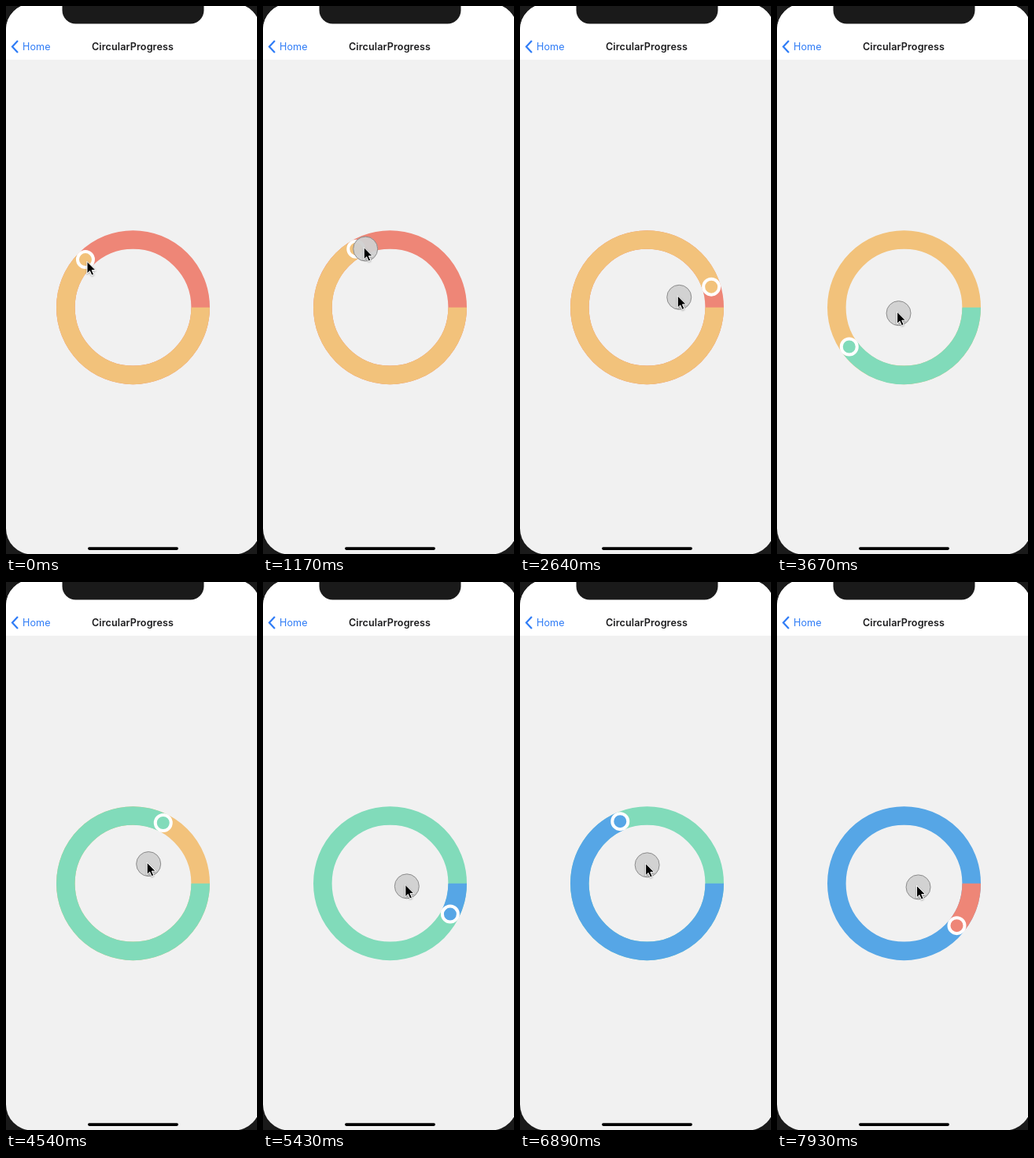
These frames come from a looping animation (319x694 px, 8 s). An HTML page:

```html
<!DOCTYPE html>
<html lang="en">
<head>
<meta charset="utf-8">
<title>Circular progress</title>
<style>
  html, body { margin: 0; width: 100%; height: 100%; overflow: hidden; background: #1a1a1a; }
  svg { display: block; width: 319px; height: 694px; }
  text { font: 12.6px Inter, "Open Sans", sans-serif; letter-spacing: .1px; }
  .title { font-weight: 600; text-anchor: middle; }
  .ring { fill: none; stroke-width: 23.6; }
</style>
</head>
<body>
<svg viewBox="0 0 319 694">
  <defs>
    <clipPath id="screen"><rect y="-3" width="323" height="697.5" rx="33"/></clipPath>
    <filter id="shadow" x="-50%" y="-50%" width="200%" height="200%">
      <feDropShadow dx="0" dy="1" stdDeviation="1" flood-opacity=".35"/>
    </filter>
  </defs>
  <g clip-path="url(#screen)">
    <rect width="319" height="694" fill="#f1f1f1"/>
    <rect width="319" height="68" fill="#fff"/>
  </g>
  <rect x="71.5" y="-40" width="180" height="62.5" rx="17" fill="#1a1a1a"/>
  <path d="M15 44L8 51.5L15 59" fill="none" stroke="#2f7cf6" stroke-width="2.2"/>
  <text x="21" y="56" fill="#2f7cf6">Home</text>
  <text class="title" x="161" y="56" fill="#1c1c1e">CircularProgress</text>
  <rect x="104" y="685.2" width="115" height="3.7" rx="1.8"/>

  <circle id="track" class="ring" cx="161.5" cy="381.7" r="85.7"/>
  <circle id="bar" class="ring" cx="161.5" cy="381.7" r="85.7" pathLength="360"/>
  <circle id="knob" r="10" stroke="#fff" stroke-width="4"/>
  <circle id="touch" r="15.5" fill="#d0d0d0" fill-opacity=".95" stroke="#8c8c8c"/>
  <path id="cursor" d="M0 0V15.4L3.5 12.1L5.9 17.6L8.6 16.4L6.2 11.1H11Z"
    stroke="#fff" filter="url(#shadow)"/>
</svg>
<script>
const LOOP = 8000, STEP = 146.67, PRESS = 870, DRAG = 1030;
const COLORS = ['#ee8677', '#f2c27b', '#81dbba', '#56a6e6'];

// time and turning phase in degrees
const KEYS = [
  [DRAG, 213.9], [1760, 272.7], [2640, 333.3], [3670, 514],
  [5430, 760.2], [6890, 950.3], [7930, 1136.7]
];

const $ = id => document.getElementById(id);
const rad = deg => deg * Math.PI / 180;
const polar = (x, y, r, deg) => [x + r * Math.cos(rad(deg)), y + r * Math.sin(rad(deg))];
const move = (id, [x, y]) => $(id).setAttribute('transform', `translate(${x} ${y})`);

function phaseAt(t) {
  const i = Math.max(1, KEYS.findIndex(([time]) => time >= t));
  const [t0, a] = KEYS[i - 1], [t1, b] = KEYS[i];
  return a + (b - a) * Math.max(0, (t - t0) / (t1 - t0));
}

// the drag slows at the right of the ring and speeds up at the left
function angleAt(t) {
  const phase = phaseAt(t);
  return phase - 20 * Math.sin(rad(phase));
}

// the finger spirals from the knob towards the middle
function fingerAt(t, angle) {
  const spiral = 68.5 * Math.exp(-Math.max(0, t - DRAG) / 1100);
  return polar(170, 378.5, 16 - 6 * Math.sin(rad(angle)) + spiral, angle + 1);
}

function draw(now) {
  // the screen refreshes in coarse steps
  const t = Math.floor((now % LOOP + 6) / STEP) * STEP;
  const angle = angleAt(t);
  const lap = Math.floor(angle / 360);
  const color = COLORS[(lap + 1) % 4];

  $('track').setAttribute('stroke', COLORS[lap % 4]);
  $('bar').setAttribute('stroke', color);
  $('bar').setAttribute('stroke-dasharray', `${angle % 360} 360`);
  $('knob').setAttribute('fill', color);
  move('knob', polar(161.5, 381.7, 85.7, angle));

  const pressed = t > PRESS;
  const [x, y] = fingerAt(t, angle);
  const dip = 13 * Math.sin(Math.PI * t / PRESS);
  $('touch').setAttribute('visibility', pressed ? 'visible' : 'hidden');
  move('touch', [x, y]);
  move('cursor', pressed ? [x - 2, y - 2] : [103, 323.5 + dip]);
}

const start = performance.now();
function tick() {
  draw(performance.now() - start);
  requestAnimationFrame(tick);
}
tick();
</script>
</body>
</html>
```
